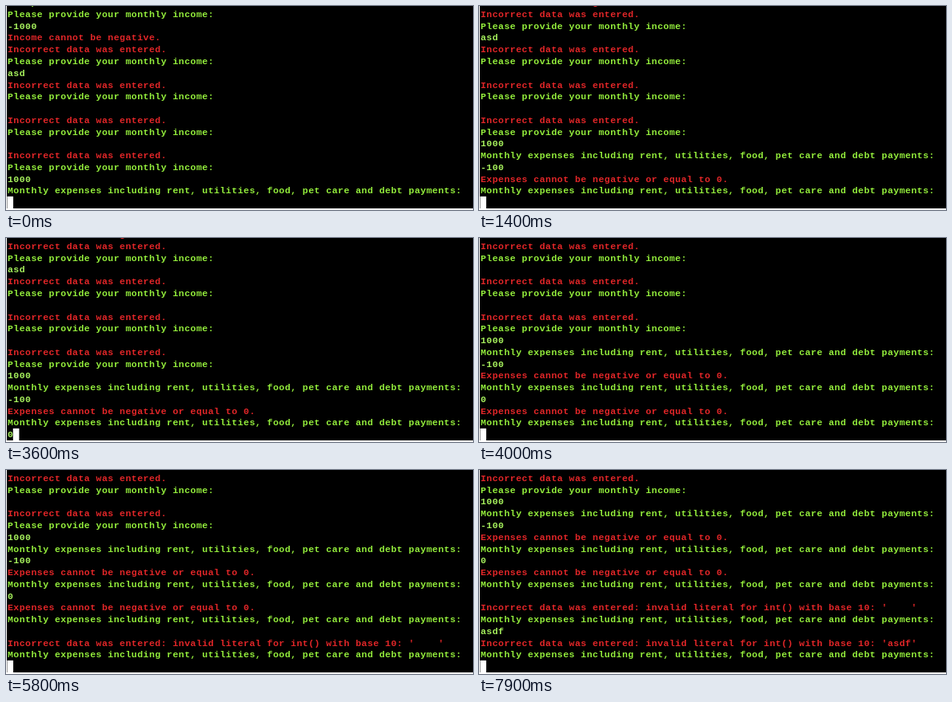
Animation of 584x256 px, one loop 8000 ms. Source, as an HTML page with a canvas:

```html
<!DOCTYPE html>
<html lang="en">
<head>
<meta charset="utf-8">
<title>Terminal session</title>
<style>
  html, body { margin: 0; width: 100%; height: 100%; overflow: hidden; background: #000; }
  canvas { display: block; width: 584px; height: 256px; }
</style>
</head>
<body>
<canvas id="stage"></canvas>
<script>
const W = 584, H = 256, LOOP = 8000;
const COL = 7.38, ROW = 14.77, LEFT = 1.7, BASE = 13.9, ROWS = 17;
const SIZE = 11.6, TRACK = COL - SIZE * 0.6;
const GREEN = '#94ee3c', RED = '#e22628', TYPED = '#a6f05c';

const canvas = document.getElementById('stage');
const ctx = canvas.getContext('2d');
const ratio = window.devicePixelRatio || 1;
canvas.width = W * ratio;
canvas.height = H * ratio;

const say = text => ({ text, color: GREEN });
const fail = text => ({ text, color: RED });
const typed = text => ({ text, color: TYPED });

const income = say('Please provide your monthly income:');
const expenses = say('Monthly expenses including rent, utilities, food, pet care and debt payments:');
const bad = fail('Incorrect data was entered.');
const tooLow = fail('Expenses cannot be negative or equal to 0.');
const notInt = s => fail(`Incorrect data was entered: invalid literal for int() with base 10: '${s}'`);

const history = [
  say('    p'),
  income, typed('-1000'), fail('Income cannot be negative.'), bad,
  income, typed('asd'), bad,
  income, typed(''), bad,
  income, typed(''), bad,
  income, typed('1000'), expenses
];

// Each answer: its text, the time of every key, the time of Enter, the reply
const answers = [
  { text: '-100', keys: [300, 500, 700, 800], enter: 1100, reply: tooLow },
  { text: '0', keys: [3300], enter: 3800, reply: tooLow },
  { text: '    ', keys: [4800, 4900, 5100, 5200], enter: 5600, reply: notInt('    ') },
  { text: 'asdf', keys: [6800, 6900, 7100, 7300], enter: 7600, reply: notInt('asdf') }
];

function stateAt(t) {
  const lines = history.slice();
  let input = '';
  for (const a of answers) {
    if (t >= a.enter) {
      lines.push(typed(a.text), a.reply, expenses);
    } else {
      input = a.text.slice(0, a.keys.filter(k => t >= k).length);
      break;
    }
  }
  lines.push(typed(input));
  return { lines, column: input.length };
}

function draw(t) {
  const { lines, column } = stateAt(t);
  ctx.setTransform(ratio, 0, 0, ratio, 0, 0);
  ctx.fillStyle = '#000';
  ctx.fillRect(0, 0, W, H);

  ctx.font = `bold ${SIZE}px "Liberation Mono", "Courier New", monospace`;
  ctx.letterSpacing = TRACK + 'px';
  ctx.textBaseline = 'alphabetic';
  const top = lines.length - ROWS;
  for (let i = -1; i < ROWS; i++) {
    const { text, color } = lines[top + i];
    ctx.fillStyle = color;
    ctx.fillText(text, LEFT + TRACK / 2, BASE + i * ROW);
  }

  ctx.fillStyle = '#fff';
  ctx.fillRect(LEFT - 0.3 + column * COL, 239, COL + 0.3, 15);

  // Window border
  ctx.fillRect(0, 0, 1, H);
  ctx.fillRect(0, 254, W, 2);
}

const start = performance.now();
function tick() {
  draw((performance.now() - start) % LOOP);
  requestAnimationFrame(tick);
}
tick();
</script>
</body>
</html>
```
